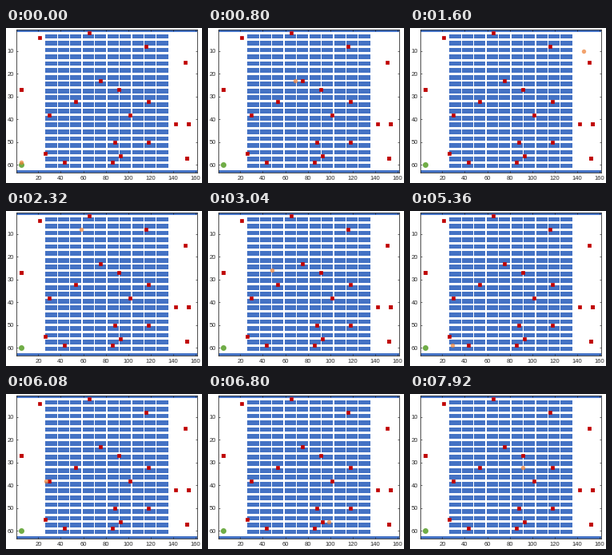
A matplotlib script for the animation above (8000 ms loop, 245 by 194 pixels).

```python
import matplotlib.pyplot as plt
from matplotlib.animation import FuncAnimation

WIDTH, HEIGHT, DPI = 245, 194, 100
FRAMES, INTERVAL, STEPS_PER_FRAME = 100, 80, 10
COLUMNS, ROWS = 161, 63
BLOCK_X, BLOCK_Y = 27, 3          # first shelf cell
BLOCKS, SHELVES = 10, 20          # blocks per row, rows of shelves
AISLE_END = BLOCK_X + 11 * BLOCKS - 1
BLUE, RED, GREEN, ORANGE, INK = "#4472c4", "#c00000", "#70ad47", "#ed7d31", "#262626"
PT = 72 / DPI  # points per pixel

START, DEPOT = (5, 59), (5, 60)
# Stops in picking order; a repeated stop is a one-step wait
TOUR = [(5, 27), (75, 23), (151, 15), (116, 8), (21, 4), (53, 32), (118, 32),
        (118, 50), (154, 42), (154, 42), (154, 42), (88, 50), (43, 59), (26, 55),
        (5, 27), (5, 27), (30, 38), (93, 56), (152, 57), (152, 57), (92, 27)]
UNPICKED = [(65, 2), (102, 38), (142, 42), (86, 59)]


def is_shelf(x, y):
    return (BLOCK_X <= x < AISLE_END and (x - BLOCK_X) % 11 < 10
            and BLOCK_Y <= y < ROWS and (y - BLOCK_Y) % 3 < 2)


def neighbours(cell):
    """Free cells around one cell, sideways ones first."""
    x, y = cell
    around = [(x - 1, y), (x + 1, y), (x, y - 1), (x, y + 1)]
    return [(i, j) for i, j in around
            if 1 <= i <= COLUMNS and 1 < j < ROWS and not is_shelf(i, j)]


def distances_to(goal):
    found, front = {goal: 0}, [goal]
    while front:
        reached = []
        for cell in front:
            for near in neighbours(cell):
                if near not in found:
                    found[near] = found[cell] + 1
                    reached.append(near)
        front = reached
    return found


def walk(start, goal):
    """Shortest path: straight along the aisles, zigzag on the open floor."""
    if start == goal:
        return [goal]
    distance, path = distances_to(goal), []
    cell, went_sideways = start, False
    while cell != goal:
        x, y = cell
        closer = [n for n in neighbours(cell) if distance[n] < distance[cell]]
        in_open = not BLOCK_X - 1 <= x <= AISLE_END
        steep = abs(goal[1] - y) > abs(goal[0] - x)
        cell = closer[-1] if in_open and (steep or went_sideways) else closer[0]
        went_sideways = cell[1] == y
        path.append(cell)
    return path


route = [START]
for stop in TOUR:
    route += walk(route[-1], stop)

fig = plt.figure(figsize=(WIDTH / DPI, HEIGHT / DPI), dpi=DPI, facecolor="white")
left, right, top, bottom = 13, 239, 2, 181
ax = fig.add_axes([left / WIDTH, 1 - bottom / HEIGHT,
                   (right - left) / WIDTH, (bottom - top) / HEIGHT])
ax.set_xlim(0.5, COLUMNS + 0.5)
ax.set_ylim(ROWS + 0.5, 0.5)

blocks = [(BLOCK_X - 0.5 + 11 * k, 10) for k in range(BLOCKS)]
for k in range(SHELVES):
    ax.broken_barh(blocks, (BLOCK_Y - 0.5 + 3 * k, 2), facecolors=BLUE, linewidth=0)
for wall in (1, ROWS):
    ax.broken_barh([(0.5, COLUMNS)], (wall - 0.5, 1), facecolors=BLUE, linewidth=0)


def dots(points, marker, size, color, **style):
    return ax.scatter(*zip(*points), marker=marker, s=(size * PT) ** 2, color=color,
                      linewidth=0, snap=False, **style)


dots(TOUR + UNPICKED, "s", 4.7, RED, zorder=4)
dots([DEPOT], "o", 7, GREEN, zorder=3)
picker = dots([START], "o", 5.4, ORANGE, alpha=0.7, zorder=5)

ax.set_xticks(range(20, COLUMNS, 20))
ax.set_yticks(range(10, ROWS, 10))
ax.tick_params(direction="in", top=True, right=True, length=2 * PT, width=0.7 * PT,
               color=INK, labelcolor=INK, labelsize=7.6 * PT, pad=3.2 * PT,
               labelfontfamily="Liberation Sans")
ax.tick_params(axis="x", pad=4.5 * PT)
for spine in ax.spines.values():
    spine.set(linewidth=0.8 * PT, color=INK)


def update(frame):
    picker.set_offsets([route[frame * STEPS_PER_FRAME]])
    return picker,


anim = FuncAnimation(fig, update, frames=FRAMES, interval=INTERVAL,
                     repeat=True, repeat_delay=0, blit=False)
plt.show()
```
